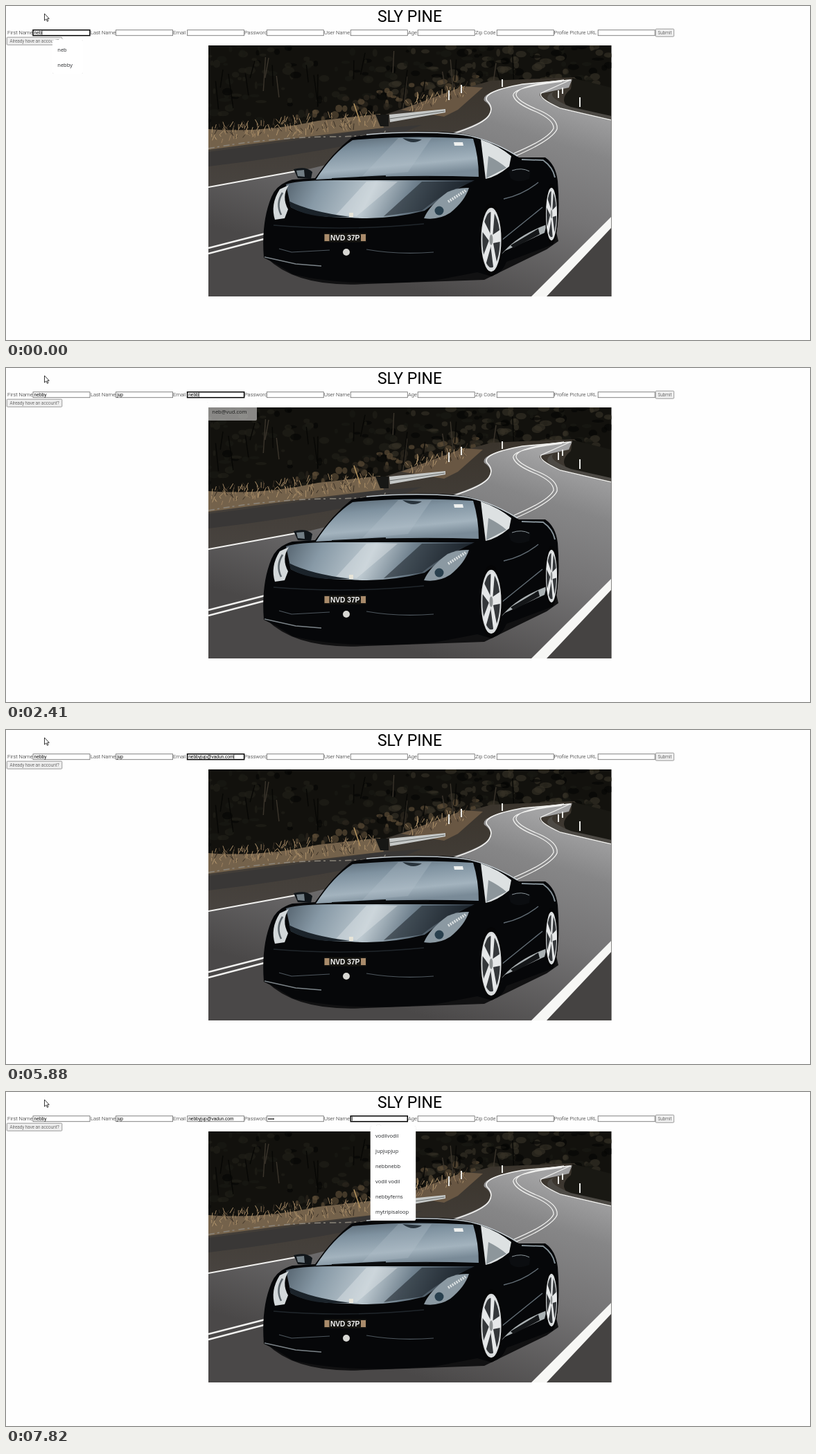
These frames come from a looping animation (1160 by 483 pixels, 8000 ms). An HTML page:

```html
<!DOCTYPE html>
<html lang="en">
<head>
<meta charset="utf-8">
<title>Sign up</title>
<style>
  html, body { margin: 0; width: 100%; height: 100%; overflow: hidden; background: #fefefe; }
  svg { display: block; width: 100%; height: 100%; }
  text { white-space: pre; }
  .title { font: 400 23px Roboto, sans-serif; text-anchor: middle; }
  .label { font: 300 7.55px Roboto, sans-serif; fill: #222; }
  .button rect { fill: #efefef; stroke: #858585; stroke-width: .8; }
  .button text { font: 300 6.4px Roboto, sans-serif; fill: #333; text-anchor: middle; }
  .field { fill: #fff; stroke: #767676; stroke-width: .9; }
  .field.focus { stroke: #000; stroke-width: 1.5; }
  .value { font: 6.55px "Liberation Sans", Arial, sans-serif; }
  .popup { filter: drop-shadow(0 .6px .7px rgba(0, 0, 0, .24)); }
  .popup text { font: 7.5px "Open Sans", "Noto Sans", sans-serif; fill: #26282b; }
  .popup .sub { font-size: 7px; fill: #5f6368; }
  .popup .menu { fill: #5f6368; }
  .plate { font: 700 10.2px "Liberation Sans", Arial, sans-serif; fill: #f2f2f2; text-anchor: middle; }
</style>
</head>
<body>
<svg viewBox="0 0 1160 483" preserveAspectRatio="none">
  <defs>
    <clipPath id="frame"><rect x="292" y="57" width="581.5" height="363"/></clipPath>
    <linearGradient id="road" gradientUnits="userSpaceOnUse" x1="720" y1="105" x2="620" y2="420">
      <stop offset="0" stop-color="#a3a3a4"/><stop offset=".2" stop-color="#868687"/><stop offset=".5" stop-color="#757475"/><stop offset="1" stop-color="#4a4848"/>
    </linearGradient>
    <linearGradient id="glass" x1="0" y1="0" x2=".35" y2="1">
      <stop offset="0" stop-color="#54636f"/><stop offset=".35" stop-color="#7f92a0"/><stop offset=".75" stop-color="#a3b3be"/><stop offset="1" stop-color="#798a97"/>
    </linearGradient>
    <linearGradient id="hood" x1="0" y1="0" x2="1" y2=".1">
      <stop offset="0" stop-color="#55636f"/><stop offset=".2" stop-color="#8799a6"/><stop offset=".48" stop-color="#bdc9d0"/><stop offset=".68" stop-color="#71828f"/><stop offset="1" stop-color="#222b34"/>
    </linearGradient>
    <linearGradient id="bank" x1="0" y1="0" x2="0" y2="1">
      <stop offset="0" stop-color="#3a342c"/><stop offset="1" stop-color="#565353"/>
    </linearGradient>
  </defs>

  <text class="title" x="582.5" y="23">SLY PINE</text>
  <g id="form"></g>

  <g clip-path="url(#frame)">
    <rect x="292" y="57" width="582" height="363" fill="#12110d"/>
    <g id="trees"></g>
    <!-- ground and road -->
    <path d="M292 181 Q400 182 530 163 L640 125 L700 108 L820 103 L873 150 V420 H292Z" fill="url(#bank)"/>
    <path d="M292 178 Q370 184 450 166 L540 156 L545 176 Q430 189 292 208Z" fill="#74624b"/>
    <path d="M570 150 L660 116 L688 118 L652 150 L632 160Z" fill="#695743"/>
    <g id="grass"></g>
    <path d="M292 211 Q410 196 530 178 L600 172 L560 188 Q430 216 292 232Z" fill="#393736"/>
    <path d="M292 206 Q380 190 470 189 T545 178" fill="none" stroke="#8b857b" stroke-width="1.5" stroke-dasharray="9 4 3 6"/>
    <path d="M292 262 L440 235 L600 196 Q680 175 694 160 Q706 148 690 137 Q684 124 745 113 L817 106 L812 118 L770 127 Q768 134 800 148 L873 165 V420 H292Z" fill="url(#road)"/>
    <path d="M817 104 L873 118 V163 L815 150 Q795 136 815 120Z" fill="#191813"/>
    <path d="M790 124 Q780 132 815 146 L873 159 V166 L800 148 Q768 134 790 124Z" fill="#4d4a45"/>
    <path d="M873 317 L776 420 H873Z" fill="#454342"/>
    <g fill="none" stroke="#f1f1ef">
      <path d="M292 262 L418 239" stroke-width="2"/>
      <path d="M600 197 Q686 176 697 158 Q704 147 694 137 Q686 124 745 113 L815 107" stroke-width="1.6"/>
      <path d="M814 107 L772 126 Q767 133 800 148 L873 165" stroke-width="1.3"/>
      <path d="M805 107 Q738 115 736 127 Q735 137 770 151 Q797 163 795 178 Q788 194 735 217 M802 109 Q728 118 732 130 Q735 141 765 153 Q791 165 790 177 Q783 192 733 213" stroke-width="1.3"/>
      <path d="M292 350 L374 329 M292 358 L372 337" stroke-width="2.4"/>
    </g>
    <path d="M758 420 L873 305 V321 L780 420Z" fill="#f7f7f5"/>
    <!-- guard rail and posts -->
    <path d="M553 157 L634 149 V154 L554 168Z" fill="#c5c8c7"/>
    <path d="M553 163 L633 152" stroke="#686b69" fill="none"/>
    <path d="M533 157 H552 V174 H540Z" fill="#171715"/>
    <path d="M502 141 L511 168" stroke="#bd9a63" stroke-width="1.4"/>
    <path d="M639 122 V136 M657 114 V126 M716 106 V117 M828 132 V146 M797 122 V133 M803 118 V127" stroke="#e9e9e5" stroke-width="2"/>

    <!-- car -->
    <path d="M376 364 Q420 408 520 402 L690 396 L780 352 L797 340 L790 310Z" fill="#111112"/>
    <path d="M372 364 Q368 312 383 276 Q390 258 413 251 L446 249 Q470 213 499 190 Q560 178 645 183 Q692 187 740 219 L778 219 Q793 229 796 253 Q801 314 789 345 L722 370 Q714 390 697 390 L680 385 L618 397 Q490 407 414 388 L390 373Z" fill="#060709"/>
    <path d="M520 186 Q590 180 650 185 Q690 188 738 217" fill="none" stroke="#c3cbd0" stroke-width="1.7"/>
    <path d="M447 251 Q472 212 500 194 Q580 186 674 192 Q682 218 682 247 Q570 243 447 251Z" fill="url(#glass)"/>
    <path d="M566 191 L614 191 L580 240 L514 246Z" fill="#b3c0c9" opacity=".3"/>
    <path d="M572 191 Q587 202 600 193" fill="#29343d"/>
    <path d="M646 197 h13 l1 5 h-13Z" fill="#eef0ef"/>
    <path d="M470 250 L548 246 M520 249 L610 247" stroke="#0b0d0f" stroke-width="2"/>
    <path d="M685 193 Q711 202 729 217 L726 232 Q708 247 692 250Z" fill="#dde1e2"/>
    <path d="M696 217 Q712 225 722 234 L693 249Z" fill="#8d969b"/>
    <path d="M404 258 Q420 252 475 252 L676 252 Q642 267 604 296 Q550 310 497 306 Q438 306 411 291Z" fill="url(#hood)"/>
    <path d="M520 254 L565 254 L506 304 L476 302Z" fill="#e3e9ec" opacity=".4"/>
    <path d="M600 254 L675 254 Q635 267 600 296 L545 304Z" fill="#10161d" opacity=".5"/>
    <path d="M408 282 Q440 298 497 305 Q438 308 411 291Z" fill="#1b232a"/>
    <path d="M415 236 Q433 231 442 240 L440 250 L421 249Z" fill="#11161a"/>
    <path d="M419 238 L430 237 L431 247 L421 246Z" fill="#727e85"/>
    <path d="M725 239 Q739 231 757 238 L755 250 Q737 257 728 249Z" fill="#0b0d10"/>
    <path d="M730 238 Q744 233 755 239" fill="none" stroke="#8a9499"/>
    <path d="M408 259 Q397 276 407 294 L402 307 L388 309 Q381 287 395 265Z" fill="#d3d8da"/>
    <path d="M399 270 Q389 286 397 302" fill="none" stroke="#5c656b" stroke-width="2.5"/>
    <path d="M603 307 Q611 288 637 269 Q652 262 668 263 Q662 282 641 299 Q624 310 603 307Z" fill="#8b99a2"/>
    <circle cx="625" cy="296" r="6.5" fill="#29404e"/>
    <path d="M638 283 L663 267" stroke="#dde2e3" stroke-width="4" stroke-dasharray="2 1.5"/>
    <path d="M386 317 Q490 326 603 315" fill="none" stroke="#20262b" stroke-width="1.3"/>
    <path d="M394 351 L412 356 L467 353 M520 352 Q565 360 617 356" fill="none" stroke="#4d565d" stroke-width="1.2"/>
    <path d="M373 363 L418 373 L455 376" fill="none" stroke="#7b8388" stroke-width="1.3"/>
    <path d="M714 360 Q735 333 780 316 L777 328 L720 354Z" fill="#aab1b3"/>
    <path d="M728 346 L768 322 L770 330 L732 350Z" fill="#141618"/>
    <path d="M716 338 L774 291 M718 279 Q746 273 768 255" fill="none" stroke="#606b73" stroke-width="1.5"/>
    <path d="M744 222 L775 223 Q789 233 792 248" fill="none" stroke="#849097" stroke-width="2"/>
    <g id="wheels"></g>
    <rect x="495" y="299" width="6" height="6" fill="#e8e5d9"/>
    <rect x="459" y="328.5" width="61" height="13" fill="#171612"/>
    <path d="M459.5 330 h7 v10 h-7Z M512 330 h7 v10 h-7Z" fill="#a98b6b"/>
    <text class="plate" x="489.2" y="339">NVD 37P</text>
    <circle cx="491" cy="356" r="5" fill="#d7d7d3"/>
  </g>

  <g id="popups"></g>
  <path d="M55.5 11 V21 L57.9 18.9 L59.5 22.3 L61 21.6 L59.5 18.3 H62.3Z" fill="#fff" stroke="#222" stroke-width=".9"/>
</svg>

<script>
const LOOP = 8000;
const $ = id => document.getElementById(id);

function add(parent, tag, attrs = {}, text = "") {
  const el = document.createElementNS("http://www.w3.org/2000/svg", tag);
  for (const k in attrs) el.setAttribute(k, attrs[k]);
  el.textContent = text;
  return parent.appendChild(el);
}

let seed = 7;
function rand(min, max) {
  seed = (seed * 16807) % 2147483647;
  return min + (max - min) * seed / 2147483647;
}

// ---- scenery ----
function drawScenery() {
  for (let i = 0; i < 260; i++) {
    const x = rand(292, 873), y = rand(57, x < 560 ? 175 : 125);
    const light = x > 560 ? "#353126" : "#211f18";
    add($("trees"), "ellipse", {
      cx: x, cy: y, rx: rand(2, 9), ry: rand(2, 6), opacity: .65,
      fill: ["#050604", light, "#1a1913", light][i % 4]
    });
  }
  // dry shrubs below the trees
  for (let i = 0; i < 60; i++) {
    const x = rand(420, 680);
    add($("trees"), "ellipse", {
      cx: x, cy: 165 - (x - 420) * .2 + rand(-18, 8), rx: rand(2, 6), ry: rand(2, 6),
      fill: i % 2 ? "#5a4a36" : "#2b261d", opacity: .7
    });
  }
  for (let i = 0; i < 24; i++) {
    const x = rand(300, 740), y = rand(65, 110);
    add($("trees"), "path", {
      d: `M${x} ${y} l${rand(-7, 7)} ${rand(18, 50)}`,
      stroke: i % 3 ? "#070705" : "#3b352c", "stroke-width": 1.4
    });
  }
  for (let i = 0; i < 240; i++) {
    const right = i % 4 === 0;
    const x = right ? rand(580, 665) : rand(292, 535);
    const y = right ? 150 - (x - 580) * .32 + rand(-12, 7) : 190 - (x - 292) * .09 + rand(-14, 10);
    add($("grass"), "path", {
      d: `M${x} ${y} l${rand(-5, 5)} ${-rand(3, 10)}`,
      stroke: ["#9a7f5e", "#3a3025", "#b0946c"][i % 3], "stroke-width": 1
    });
  }
}

function wheel(cx, cy, rx, ry) {
  const g = add($("wheels"), "g", { transform: `translate(${cx} ${cy}) scale(${rx} ${ry})` });
  add(g, "circle", { r: 1.15, fill: "#050506" });
  add(g, "circle", { r: .94, fill: "#34373a", stroke: "#d9dcdd", "stroke-width": .13 });
  for (let i = 0; i < 5; i++)
    add(g, "path", { d: "M-.12 0 L-.19 -.93 H.19 L.12 0Z", fill: "#e6e8e9", transform: `rotate(${i * 72 + 10})` });
  add(g, "circle", { r: .17, fill: "#8d9192" });
}

// ---- form ----
const fields = [
  ["First Name", 2, 39], ["Last Name", 122, 158.6], ["Email", 241, 261.6], ["Password", 344, 376.3],
  ["User Name", 459, 497.3], ["Age", 580, 594.2], ["Zip Code", 677, 708.3], ["Profile Picture URL", 790.5, 854.2]
].map(([name, labelX, x]) => {
  add($("form"), "text", { class: "label", x: labelX, y: 41 }, name);
  const box = add($("form"), "rect", { class: "field", x, y: 34.7, width: 82, height: 8 });
  const value = add($("form"), "text", { class: "value", x: x + 1.6, y: 41 });
  return { x, box, value };
});
const caret = add($("form"), "rect", { y: 35.6, width: .8, height: 6 });

function button(x, y, width, text) {
  const g = add($("form"), "g", { class: "button" });
  add(g, "rect", { x, y, width, height: 11, rx: 1 });
  add(g, "text", { x: x + width / 2, y: y + 7.9 }, text);
}

// ---- popups ----
const popups = [];

function popup(x, width, bottom, start, fade, end, ghost = .45) {
  const el = add($("popups"), "g", { class: "popup" });
  add(el, "rect", { x, y: 49, width, height: bottom - 49, rx: 2, fill: "#fff" });
  add(el, "path", { d: `M${x + 7} 50 l5 -4 l5 4Z`, fill: "#fff" });
  popups.push({ el, start, fade, end, ghost });
  return el;
}

function list(x, width, items, start, fade, end, ghost) {
  const el = popup(x, width, 76 + 22 * (items.length - 1), start, fade, end, ghost);
  items.forEach((item, i) => add(el, "text", { x: x + 7.3, y: 65.7 + 22 * i }, item));
}

function addresses(x, people, start, end) {
  const rule = 90 + 35.3 * (people.length - 1);
  const el = popup(x, 109.5, rule + 27.2, start, end, end);
  people.forEach(([name, sub], i) => {
    const y = 69.6 + 35.3 * i, cx = x + 12;
    add(el, "circle", { cx, cy: y, r: 3.7, fill: "none", stroke: "#4b4f54", "stroke-width": .9 });
    add(el, "circle", { cx, cy: y - 1, r: 1.3, fill: "#4b4f54" });
    add(el, "path", { d: `M${cx - 2.6} ${y + 2.6} q2.6 -3 5.2 0 q-2.6 2 -5.2 0Z`, fill: "#4b4f54" });
    add(el, "text", { x: x + 24.2, y: y - 3.6 }, name);
    add(el, "text", { class: "sub", x: x + 24.2, y: y + 8.9 }, sub);
  });
  add(el, "rect", { x, y: rule, width: 109.5, height: .7, fill: "#dcdde0" });
  add(el, "circle", { cx: x + 12, cy: rule + 13.7, r: 4, fill: "#4b4f54" });
  add(el, "text", { class: "menu", x: x + 24.2, y: rule + 16.4 }, "Manage addresses...");
}

drawScenery();
wheel(787, 301, 8, 38);
wheel(700, 338, 14.5, 46);
button(1.3, 45.2, 79.5, "Already have an account?");
button(937.3, 33.2, 26.4, "Submit");

list(67, 44, ["neb", "nebby"], 0, 150, 150);
list(67, 44, ["nebby"], 150, 310, 470);
addresses(187.3, [["fomedig", "00417"], ["fomedig", "00532"]], 770, 1230);
list(187.7, 50, ["jupjup", "jupjups"], 1230, 1660, 1810);
addresses(289.7, [["vfome37@ombil.com", "vodil fomedig"]], 1660, 1960);
list(290, 72, ["neb@vud.com"], 1960, 2410, 2560, .5);
const account = popup(407, 193, 76, 6030, 6780, 6930, .62);
add(account, "circle", { cx: 419, cy: 63, r: 4.6, fill: "#4285f4" });
add(account, "text", { x: 431, y: 65.8, style: "font-size:7.35px" }, "Use passwords saved in your Pundol Account");
list(525.7, 65.5, ["vodilvodil", "jupjupjup", "nebbnebb", "vodil vodil", "nebbyferns", "mytripisaloop"], 7820, LOOP, LOOP);

// ---- timing ----
const focusTimes = [0, 770, 1660, 6030, 7820];
const typing = [
  { text: "nebby", keys: [0, 0, 0, 150, 310] },
  { text: "jup", keys: [1230, 1360, 1510] },
  { text: "nebbyjup@vadun.com", keys: [1960, 2110, 2260, 2410, 2560, 2710, 2860, 3100, 3670,
    4880, 5030, 5180, 5330, 5480, 5610, 5730, 5880, 5880] },
  { text: "••••", keys: [6630, 7080, 7350, 7500] }
];
const blinks = [[3550, 3670], [4270, 4730]];
const count = (times, t) => times.filter(k => k <= t).length;

function render(t) {
  const active = count(focusTimes, t) - 1;
  typing.forEach(({ text, keys }, i) => {
    fields[i].value.textContent = text.slice(0, count(keys, t));
  });
  fields.forEach((f, i) => f.box.classList.toggle("focus", i === active));
  const f = fields[active];
  const length = f.value.textContent ? f.value.getComputedTextLength() : 0;
  caret.setAttribute("x", f.x + 1.6 + length);
  caret.style.opacity = blinks.some(([a, b]) => t >= a && t < b) ? 0 : 1;
  for (const p of popups) {
    p.el.style.display = t >= p.start && t < p.end ? "" : "none";
    p.el.style.opacity = t < p.fade ? 1 : p.ghost;
  }
}

const began = performance.now();
function tick() {
  render((performance.now() - began) % LOOP);
  requestAnimationFrame(tick);
}
tick();
</script>
</body>
</html>
```
